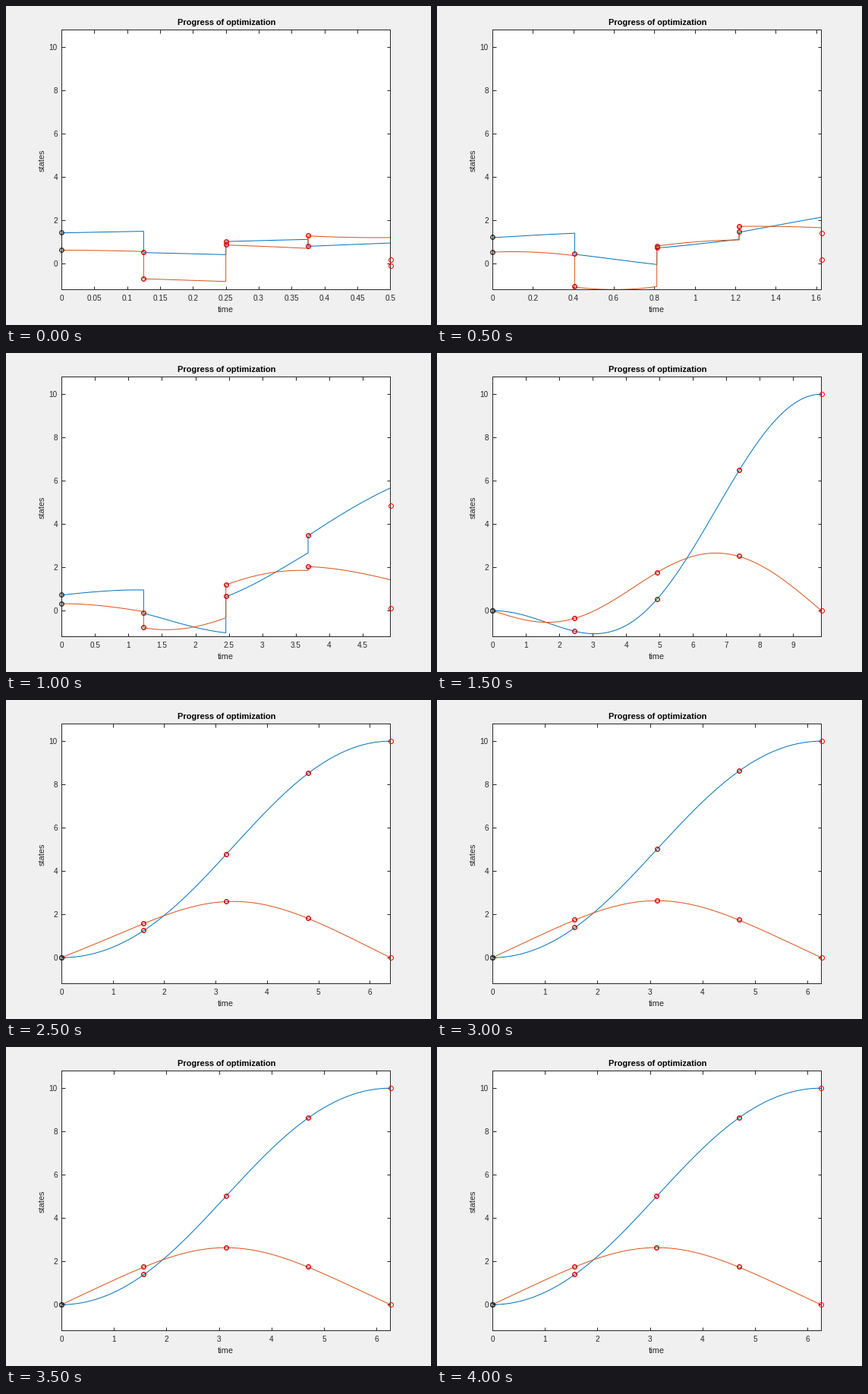
A matplotlib script that plays this animation: 560x420 px, repeating every 8000 ms.

```python
import numpy as np
import matplotlib.pyplot as plt
from matplotlib.animation import FuncAnimation

WIDTH, HEIGHT, DPI = 560, 420, 80
PX = 72 / DPI  # one pixel in points
LEFT, RIGHT, BOTTOM, TOP = 73, 506.4, 46.6, 388.6
Y_MIN, Y_MAX = -1.2, 10.8
SEGMENTS, GOAL = 4, 10
INK = "#262626"
BLUE, ORANGE, RED = "#0072bd", "#d95319", "#ff0000"

plt.rcParams["font.family"] = "Liberation Sans"

s = np.linspace(0, 1, 25)
phase = (np.arange(SEGMENTS)[:, None] + s) / SEGMENTS  # one row per segment


def integrate(start, rate, dt):
    """Trapezoidal integral along every segment from its own start value."""
    steps = (rate[:, 1:] + rate[:, :-1]) / 2 * dt * s[1]
    return start[:SEGMENTS, None] + np.pad(np.cumsum(steps, axis=1), ((0, 0), (1, 0)))


def rough(tf, x, v, accel):
    """Iterate with free nodes; acceleration is linear between the nodes."""
    knots = np.linspace(0, 1, SEGMENTS + 1)
    return tf, np.array(x), np.array(v), np.interp(phase, knots, accel)


def smooth(tf, skew, flat):
    """Closed trajectory to the goal; velocity is a sum of three sines."""
    amps = np.array([GOAL * np.pi / tf / 2 - flat / 3, skew, flat])
    n = np.arange(1, 4)
    angle = np.pi * np.linspace(0, 1, SEGMENTS + 1)[:, None] * n
    x = tf / np.pi * (1 - np.cos(angle)) @ (amps / n)
    v = np.sin(angle) @ amps
    accel = np.pi / tf * np.cos(np.pi * phase[..., None] * n) @ (amps * n)
    return tf, x, v, accel


def blend(a, b, w):
    return [(1 - w) * p + w * q for p, q in zip(a, b)]


guess = rough(0.5, [1.42, 0.51, 1.02, 0.80, 0.15], [0.62, -0.70, 0.86, 1.28, -0.12],
              [0, -1, -1, -1.5, 0.3])
damped = rough(1.625, [1.20, 0.43, 0.72, 1.45, 1.38], [0.53, -1.08, 0.81, 1.72, 0.15],
               [0.4, -1.2, 1.3, 0.1, -0.4])
swing = smooth(9.84, -1.43, -0.12)
solved = smooth(6.259, 0, -0.09)
final = smooth(6.25, 0, -0.09)
iterates = [guess, damped, blend(damped, swing, 0.4), swing,
            smooth(7.11, -0.76, -0.17), smooth(6.4, -0.12, -0.1),
            solved, solved, final]

fig = plt.figure(figsize=(WIDTH / DPI, HEIGHT / DPI), dpi=DPI, facecolor="#f0f0f0")
ax = fig.add_axes([LEFT / WIDTH, BOTTOM / HEIGHT,
                   (RIGHT - LEFT) / WIDTH, (TOP - BOTTOM) / HEIGHT])
ax.set_ylim(Y_MIN, Y_MAX)
ax.set_yticks(range(0, 11, 2))
ax.tick_params(direction="in", top=True, right=True, length=4.5 * PX, width=PX,
               color=INK, labelcolor=INK, labelsize=10 * PX)
ax.tick_params(axis="x", pad=6.5 * PX)
ax.tick_params(axis="y", pad=5 * PX)
for spine in ax.spines.values():
    spine.set(linewidth=PX, edgecolor=INK)


def label(x, y, text, **style):
    fig.text(x / WIDTH, 1 - y / HEIGHT, text, ha="center", fontsize=11 * PX, **style)


label(290.5, 25, "Progress of optimization", weight="bold", color="black")
label(289.5, 403, "time", color=INK)
label(48, 203, "states", color=INK, rotation=90, va="center")


def curve(color):
    return ax.plot([], [], color=color, lw=PX)[0]


def outline(color, alpha=1):
    return ax.plot([], [], color=color, alpha=alpha, lw=PX, transform=None,
                   clip_on=False, zorder=5, snap=False)[0]


x_curve, v_curve = curve(BLUE), curve(ORANGE)
squares = outline("black", 0.5)
first_rings, rings = outline("black", 0.7), outline(RED)


def polygon(sides, radius, turn=0):
    angles = turn + np.linspace(0, 2 * np.pi, sides + 1)
    return radius * np.cos(angles), radius * np.sin(angles)


RING = polygon(32, 3)
SQUARE = polygon(4, 2 * np.sqrt(2), np.pi / 4)


def stamp(line, shape, centers):
    """Repeat a closed shape at every pixel center."""
    dx, dy = shape
    xs, ys = [], []
    for cx, cy in centers:
        xs += [*(cx + dx), np.nan]
        ys += [*(cy + dy), np.nan]
    line.set_data(xs, ys)


def draw(frame):
    tf, x, v, accel = iterates[min(frame, len(iterates) - 1)]
    limit = max(tf, solved[0]) if tf == final[0] else tf
    dt = tf / SEGMENTS

    v_path = integrate(v, accel, dt)
    x_path = integrate(x, v_path, dt)
    x_curve.set_data(phase.ravel() * tf, x_path.ravel())
    v_curve.set_data(phase.ravel() * tf, v_path.ravel())

    # Markers sit on whole pixels.
    px = np.floor(73.3 + 434 * np.arange(SEGMENTS + 1) * dt / limit) + 0.5
    scale = (TOP - BOTTOM) / (Y_MAX - Y_MIN)
    nodes = [(px[k], np.floor(BOTTOM + (row[k] - Y_MIN) * scale) + 0.5)
             for k in range(SEGMENTS + 1) for row in (x, v)]
    stamp(squares, SQUARE, nodes[:-2])
    stamp(first_rings, RING, nodes[:2])
    stamp(rings, RING, nodes[2:])

    step = next(d for d in (0.05, 0.1, 0.2, 0.5, 1) if limit / d <= 10.001)
    ticks = np.arange(0, limit + 1e-6, step)
    ax.set_xticks(ticks, [f"{t:.3g}" for t in ticks])
    ax.set_xlim(0, limit)


animation = FuncAnimation(fig, draw, frames=16, interval=500, repeat=True,
                          repeat_delay=0, blit=False)
plt.show()
```
